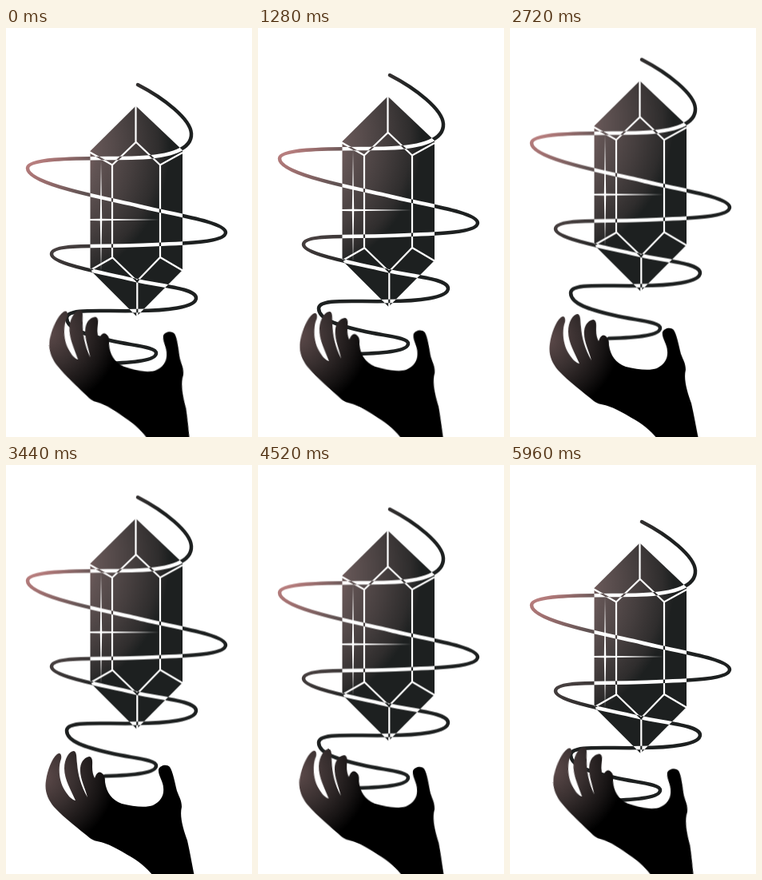
Animation of 308 by 512 pixels, one loop 6 s. Source, as an HTML page:

```html
<!DOCTYPE html>
<html lang="en">
<head>
<meta charset="utf-8">
<title>Floating crystal</title>
<style>
  html, body { margin: 0; width: 100%; height: 100%; overflow: hidden; background: #fff; }
  svg { display: block; width: 308px; height: 512px; }
  .gem { isolation: isolate; animation: rise 3s ease-in-out infinite alternate; }
  .ribbon { mix-blend-mode: difference; fill: none; stroke: #fff; stroke-width: 4.5; stroke-linecap: round; }
  .edges { fill: none; stroke: #fff; stroke-width: 2.2; }
  .tint { mix-blend-mode: screen; }
  .hand { transform-origin: 148px 455px; animation: tilt 3s ease-in-out infinite alternate; }
  @keyframes rise { to { transform: translateY(-32px); } }
  @keyframes tilt { from { transform: rotate(4.8deg); } to { transform: rotate(-.2deg); } }
</style>
</head>
<body>
<svg viewBox="0 0 308 512">
  <defs>
    <radialGradient id="gemTint" gradientUnits="userSpaceOnUse" cx="25" cy="150" r="180">
      <stop offset="0" stop-color="#cc8c8c"/>
      <stop offset=".2" stop-color="#a87474"/>
      <stop offset=".5" stop-color="#625454"/>
      <stop offset=".75" stop-color="#453e3e"/>
      <stop offset=".92" stop-color="#2f2d2d"/>
      <stop offset="1" stop-color="#1d2020"/>
    </radialGradient>
    <radialGradient id="handTint" gradientUnits="userSpaceOnUse" cx="45" cy="390" r="92">
      <stop offset="0" stop-color="#5e4b4b"/>
      <stop offset=".45" stop-color="#382f2f"/>
      <stop offset=".8" stop-color="#161313"/>
      <stop offset="1" stop-color="#000"/>
    </radialGradient>
  </defs>

  <g class="gem">
    <rect y="40" width="308" height="420" fill="#fff"/>
    <path d="M162.5 97.5 221 153V303L163.5 361 105.5 303V154Z"/>
    <path class="edges" d="M162.5 97V143L133 171.5 105 155.5M163 143 193 171.5 221 156
      M133 171V287.5L105 303.5M133 287 164 317 193 287V171M193 287 221 303.5"/>
    <path class="edges" stroke-width="3" d="M164.3 316V361"/>
    <!-- the ribbon inverts whatever it crosses -->
    <path class="ribbon" d="M165 71C198 88 231 114 232 132C233 151 208 161 163 162.5
      C120 164 27 160 27 175.5C27 196 130 214 163 222C200 232 275 242 275 256
      C275 270 210 270 163 272C110 274 57 270 57 283C57 296 130 308 163 316
      C195 323 238 326 238 338C238 350 200 354 163 354C120 355 76 350 76 363
      C76 377 100 384 130 391C160 398 188 399 188 407C188 416 160 419 124 420"/>
    <rect class="tint" y="40" width="308" height="420" fill="url(#gemTint)"/>
    <path fill="#fff" d="M119 165 120.2 238.8 192 240 120.2 241.2 119 306
      117.8 241.2 105 241V239L117.8 238.8Z"/>
  </g>

  <path class="hand" fill="url(#handTint)" d="M194 530L184 514C176 504 164 494 152 488
    C142 482 132 476 122 473C116 471 110 471 105 467C92 456 74 443 60 428
    C52 418 48 408 50 395C52 382 57 368 64 362C68 359 70 363 69 368
    C65 378 66 396 74 408C78 414 82 419 87 420C82 408 73 394 73 380
    C73 368 79 358 85 358C89 359 88 367 89 374C90 388 94 402 102 416
    C99 404 92 392 93 379C94 370 100 365 105 365C109 367 108 372 108 378
    C108 384 109 388 111 392C113 386 116 383 119 385C124 388 124 392 124 397
    C126 410 132 419 145 424C160 428 176 429 184 426C195 421 198 412 197 404
    C197 396 190 388 191 381C193 376 201 374 205 378C209 384 211 396 214 408
    C217 416 220 420 220 428C217 440 222 456 227 470C231 488 233 500 236 515L239 530Z"/>
</svg>
</body>
</html>
```
